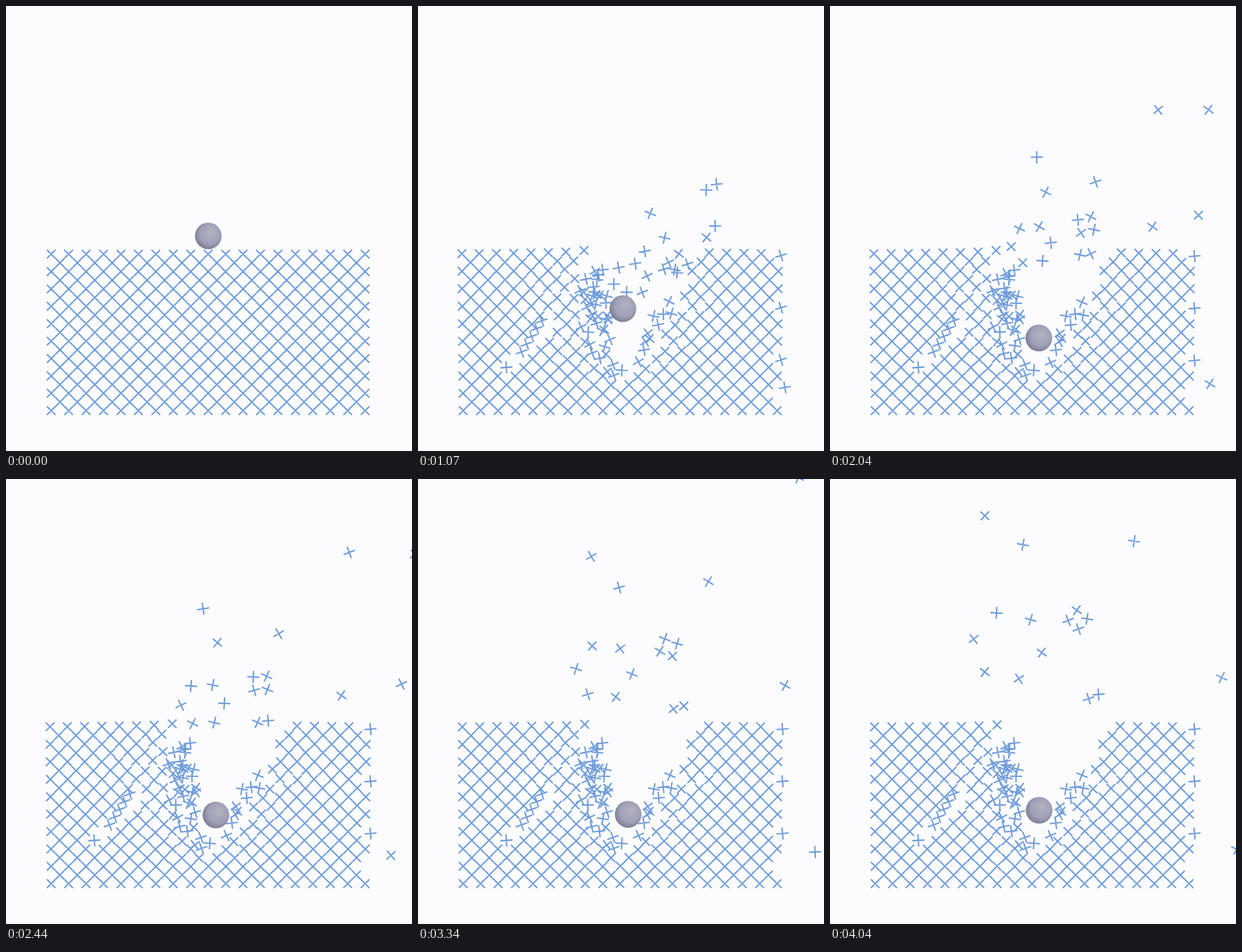
An HTML page with a canvas for the animation above (4.08 s loop, 602 by 660 pixels).

```html
<!DOCTYPE html>
<html>
<head>
<meta charset="utf-8">
<style>
html, body { margin: 0; width: 100%; height: 100%; overflow: hidden; background: #fcfcfe; }
canvas { display: block; }
</style>
</head>
<body>
<canvas id="stage" width="602" height="660"></canvas>
<script>
const ctx = document.getElementById('stage').getContext('2d');
const LOOP = 4080, STEPS = 122, ARM = 9;
const LAUNCH = 670, END = 4040;
const HOLE = [300, 440];

let seed = 7;
const rand = () => (seed = seed * 16807 % 2147483647) / 2147483647 * 2 - 1;
const clamp = v => Math.max(0, Math.min(1, v));
const easeOut = u => 1 - (1 - u) ** 2;
const dist = (a, b) => Math.hypot(a[0] - b[0], a[1] - b[1]);
const mix = (a, b, u) => [a[0] + (b[0] - a[0]) * u, a[1] + (b[1] - a[1]) * u];

// Staggered lattice of crosses whose arms meet halfway
const nodes = [];
for (let j = 0; j < 19; j++)
  for (let i = j % 2; i < 37; i += 2)
    nodes.push({
      i, j, home: [67 + 12.93 * i, 368 + 12.9 * j], start: 250,
      dx: rand(), dy: rand(), turn: rand()
    });

const craterRight = y => 410 - .42 * (y - 368);
const inCrater = ([x, y]) => x > (y < 388 ? 255 : 240) && x < craterRight(y) &&
  y + .75 * Math.abs(x - 300) < 555;

// Pieces in free flight: place at launch and speed in px per ms
const flights = [
  [394, 310, .122, -.114],
  [403, 322, .061, -.1226],
  [397, 333, .109, -.0166],
  [407, 350, .052, -.0166],
  [360, 342, -.039, -.086],
  [343, 400, -.017, -.0905],
  [354, 378, .029, -.0855],
  [536, 568, .02, -.0056]
].map(([x, y, vx, vy]) => t => [x + vx * (t - LAUNCH), y + vy * (t - LAUNCH)]);

// Clumps rise together as turning rings that may widen
const clumps = [
  { size: 4, from: [388, 405], to: [367, 207], phase: -.1, radius: 14, widen: 0, turn: 1.6 },
  { size: 2, from: [370, 400], to: [391, 322], phase: .1, radius: 8, widen: 0, turn: -.5 },
  { size: 6, from: [322, 428], to: [263, 246], phase: -.3, radius: 25, widen: 27, turn: .5 }
];
for (const c of clumps)
  for (let k = 0; k < c.size; k++)
    flights.push(t => {
      const u = (t - LAUNCH) / (END - LAUNCH);
      const [x, y] = mix(c.from, c.to, u);
      const a = c.phase + c.turn * u + k * 2 * Math.PI / c.size;
      const r = c.radius + c.widen * u * u;
      return [x + r * Math.cos(a), y + r * Math.sin(a)];
    });

// Each flight carries off the nearest piece still free
for (const flight of flights) {
  const p = flight(LAUNCH);
  nodes.filter(n => !n.flight && (n.i === 36 || inCrater(n.home)))
    .reduce((a, b) => dist(b.home, p) < dist(a.home, p) ? b : a).flight = flight;
}

// Rubble is pressed against the crater walls, mostly the left one
function settle({ home: [x, y], dx, dy }) {
  const right = craterRight(y), u = (x - 248) / (right - 248);
  if (y > 515) return [x - 4 + dx * 7, y + 4 + dy * 6];
  const wall = u < .66 ? 246 + u * 60 : right - 24 + (u - .66) * 50;
  return [wall + dx * 6, y + 26 * clamp((470 - y) / 80) + dy * 7];
}

for (const n of nodes) {
  const crack = n.i + n.j === 18 && n.i > 4 && n.i < 11;
  if (inCrater(n.home)) {
    n.start = Math.min(400, dist(n.home, [300, 361]) * 1.6);
    n.rest = settle(n);
    n.time = 1250 + n.dx * 350;
  } else if (crack) {
    const k = n.i - 5;
    n.rest = k ? [146 + 7.5 * k, 524.5 - 11.5 * k] : [131, 536];
    n.time = 350;
    n.turn = k ? .45 : .72;
  } else if (n.i === 36 && n.j % 6 === 0 && n.j < 18) {
    n.rest = [n.home[0] + 8, n.home[1] + 3];
    n.time = 1800;
    n.turn = .7;
  }
}

// The block bulges away from the hole while its base stays fixed
function bulge({ home, dx, dy }, t) {
  const d = dist(home, HOLE), reach = Math.max(0, d - 90);
  const rise = clamp(t / 900), lift = (600 - home[1]) / 232;
  const push = 5 * Math.exp(-reach / 170) * lift * rise * (1 - .5 * clamp((t - 2000) / 2000));
  const shake = 1.8 * Math.exp(-reach / 35) * rise;
  return [
    home[0] + (home[0] - HOLE[0]) / d * push + dx * shake,
    home[1] + (home[1] - HOLE[1]) / d * push + dy * shake
  ];
}

function pose(n, t, ball) {
  const age = Math.max(0, t - n.start);
  let p, angle = Math.PI / 4;
  if (n.flight) {
    p = t < LAUNCH ? mix(n.home, n.flight(LAUNCH), clamp(age / (LAUNCH - n.start))) : n.flight(t);
    angle += n.turn * age / 1000;
  } else if (n.rest) {
    const u = easeOut(clamp(age / n.time));
    p = mix(n.home, n.rest, u);
    angle += n.turn * u;
  } else {
    p = bulge(n, t);
  }
  const d = dist(p, ball);
  if (d < 25 && d > 0) p = mix(ball, p, 25 / d);
  return [...p, angle];
}

// The ball sinks ever slower, then is lifted back a little
function ballAt(t) {
  const u = clamp(t / 2840), back = clamp((t - 2840) / 1200);
  return [
    300 + 12 * u * u * (3 - 2 * u) - 2 * back * back,
    341 + 159 * (1 - (1 - u) ** 2.4) - 9 * back ** 1.3
  ];
}

function drawCrosses(poses) {
  ctx.beginPath();
  for (const [x, y, angle] of poses) {
    const c = Math.cos(angle) * ARM, s = Math.sin(angle) * ARM;
    ctx.moveTo(x - c, y - s);
    ctx.lineTo(x + c, y + s);
    ctx.moveTo(x + s, y - c);
    ctx.lineTo(x - s, y + c);
  }
  ctx.strokeStyle = '#6f9cda';
  ctx.lineWidth = 2.1;
  ctx.stroke();
}

function drawBall([x, y]) {
  const fill = ctx.createRadialGradient(x + 5, y - 6, 2, x + 2, y - 2, 22);
  fill.addColorStop(0, '#b0b0be');
  fill.addColorStop(.65, '#a0a0b8');
  fill.addColorStop(1, '#7e7e94');
  ctx.beginPath();
  ctx.arc(x, y, 19.8, 0, Math.PI * 2);
  ctx.fillStyle = fill;
  ctx.fill();
}

function frame(now) {
  const t = Math.floor(now % LOOP / LOOP * STEPS) * LOOP / STEPS;
  const ball = ballAt(t);
  ctx.fillStyle = '#fcfcfe';
  ctx.fillRect(0, 0, 602, 660);
  drawCrosses(nodes.map(n => pose(n, t, ball)));
  drawBall(ball);
}

const begin = performance.now();
function tick() {
  frame(performance.now() - begin);
  requestAnimationFrame(tick);
}
tick();
</script>
</body>
</html>
```
